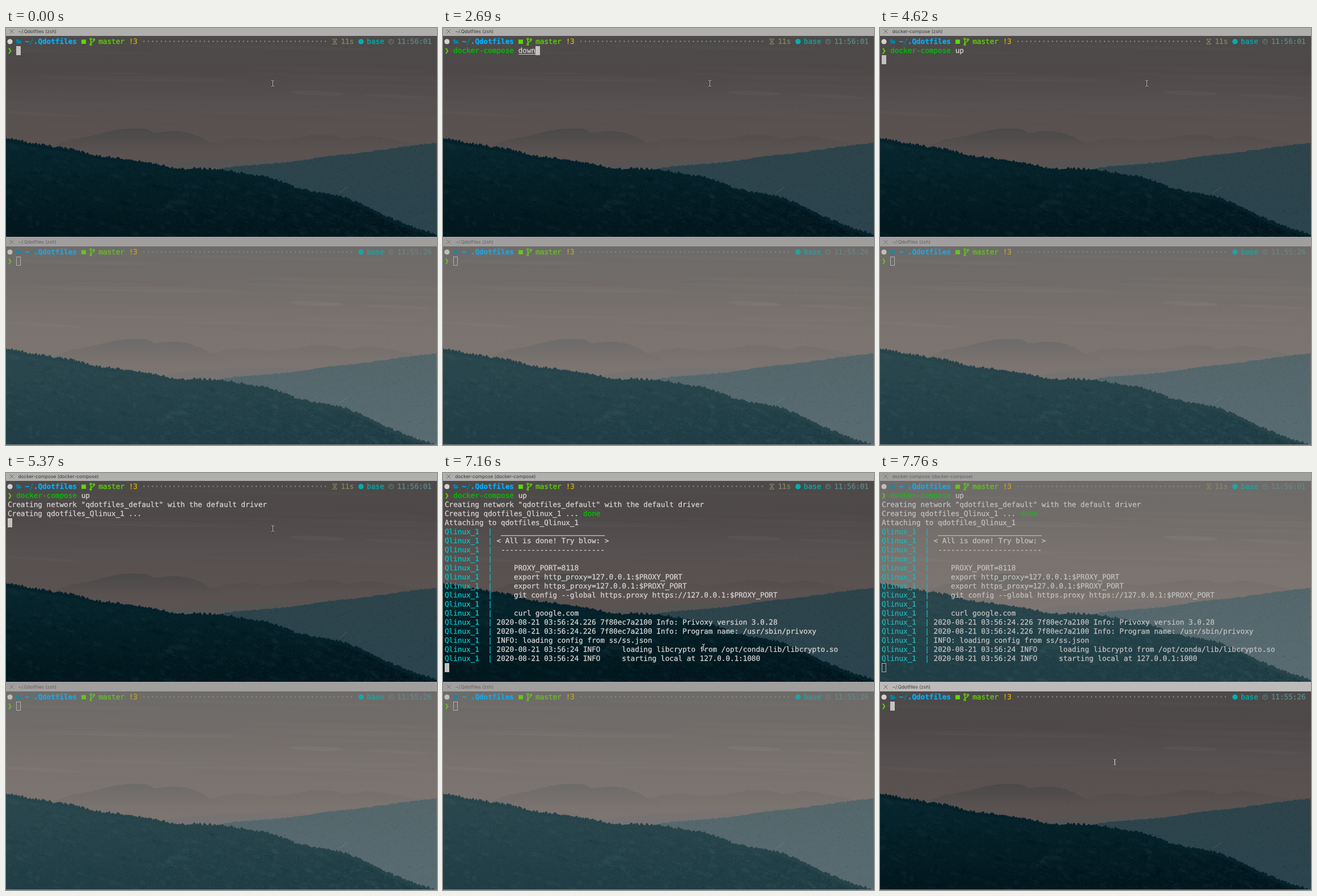
An HTML page with a canvas for the animation above (8000 ms loop, 760x737 px).

```html
<!DOCTYPE html>
<html lang="en">
<head>
<meta charset="utf-8">
<title>Terminal</title>
<style>
  html, body { margin: 0; width: 100%; height: 100%; overflow: hidden; background: #4e4a49; }
  canvas, svg { position: absolute; left: 0; top: 0; }
  text { white-space: pre; text-rendering: geometricPrecision; font-variant-ligatures: none; }
  .mono { font: 12.67px "DejaVu Sans Mono", "Liberation Mono", monospace; }
  .bar { font: 8.3px Inter, Roboto, sans-serif; }
  .dim { filter: contrast(.76); }
</style>
</head>
<body>
<canvas id="view" width="760" height="737"></canvas>
<svg id="ui" width="760" height="737" viewBox="0 0 760 737"></svg>
<script>
const LOOP = 8000, CELL = 7.63, ROW = 16, W = 760, PANE = 372;
const C = {
  text: '#d4d2d1', green: '#00c200', cyan: '#00c5c7', ghost: '#6e6b6a', cursor: '#c4c2c1',
  lime: '#5fd700', blue: '#00afff', deep: '#0087af', gold: '#d7af00', dots: '#918c89',
  olive: '#87875f', teal: '#00afaf', steel: '#5f8787'
};

// ---------- landscape ----------
const lit = {
  sky: ['#4c4a49', '#4e4948', '#565050', '#595250', '#5c5452'],
  far: ['#4b494a', '#595250'], mist: '#565453',
  right: ['#2e444b', '#2b444d'], front: ['#08272f', '#02181f'],
  tree: '#05212a', light: '#2c5258', dark: '#000f16', cloud: '#6a6665'
};
const grey = {
  sky: ['#6d6b69', '#706c69', '#78726e', '#7b7470', '#7d7672'],
  far: ['#6d6b6b', '#7a736f'], mist: '#767372',
  right: ['#55676b', '#586b71'], front: ['#2c484f', '#213e46'],
  tree: '#28444b', light: '#4f6f74', dark: '#12323b', cloud: '#8b8784'
};
const farRidge = [[88, 207], [115, 197], [150, 191], [185, 182], [215, 178], [246, 178], [262, 185],
  [300, 182], [325, 186], [345, 194], [364, 205], [387, 209]];
const lowRidge = [[355, 206], [387, 197], [420, 194], [460, 199], [505, 195], [540, 189], [570, 189],
  [602, 196], [640, 190], [685, 197], [735, 207]];
const rightRidge = [[355, 253], [400, 245], [500, 237], [560, 228], [640, 219], [700, 210], [760, 203]];
const frontRidge = [[0, 197], [45, 205], [120, 217], [160, 228], [230, 236], [270, 243], [300, 251],
  [340, 250], [380, 252], [420, 259], [460, 265], [490, 275], [520, 286], [600, 302], [640, 319],
  [680, 339], [720, 355], [760, 367]];

function random(seed) {
  return () => (seed = (seed * 16807) % 2147483647) / 2147483647;
}

function heightAt(ridge, x) {
  let i = 1;
  while (i < ridge.length - 1 && ridge[i][0] < x) i++;
  const [x0, y0] = ridge[i - 1], [x1, y1] = ridge[i];
  return y0 + (y1 - y0) * (x - x0) / (x1 - x0);
}

function scene(p) {
  const canvas = document.createElement('canvas');
  canvas.width = W;
  canvas.height = 370;
  const g = canvas.getContext('2d'), rnd = random(4711);

  const fade = (y0, y1, stops) => {
    const f = g.createLinearGradient(0, y0, 0, y1);
    stops.forEach((c, i) => f.addColorStop(i / (stops.length - 1), c));
    return f;
  };
  const blob = (x, y, rx, ry, color, alpha, tilt = 0) => {
    g.globalAlpha = alpha;
    g.fillStyle = color;
    g.beginPath();
    g.ellipse(x, y, rx, ry, tilt, 0, 7);
    g.fill();
    g.globalAlpha = 1;
  };
  const hill = (ridge, fill, rough, step) => {
    const [start] = ridge[0], [end] = ridge[ridge.length - 1];
    g.beginPath();
    g.moveTo(start, 370);
    for (let x = start; x <= end; x += step) g.lineTo(x, heightAt(ridge, x) - (rnd() - .4) * rough);
    g.lineTo(end, 370);
    g.fillStyle = fill;
    g.fill();
  };

  g.fillStyle = fade(14, 250, p.sky);
  g.fillRect(0, 0, W, 370);
  for (let i = 0; i < 26; i++)
    blob(rnd() * W, 30 + rnd() * 140, 70 + rnd() * 170, 1.5 + rnd() * 4, i % 2 ? p.cloud : p.sky[0], .07, .02);
  blob(548, 115, 48, 4, p.cloud, .22, .04);
  blob(690, 121, 60, 3, p.cloud, .14, .05);
  blob(60, 152, 75, 3, p.cloud, .14, .06);

  g.globalAlpha = .6;
  hill(lowRidge, fade(184, 215, p.far), 1.6, 3);
  g.globalAlpha = 1;
  hill(farRidge, fade(180, 218, p.far), 1.6, 3);
  g.fillStyle = fade(216, 250, [p.far[1], p.sky[4]]);
  g.fillRect(0, 216, W, 154);
  hill([[265, 246], [310, 236], [380, 231], [470, 228], [560, 232]], p.mist, 1, 4);

  hill(rightRidge, fade(205, 330, p.right), 2.4, 2);
  for (let i = 0; i < 3500; i++) {
    const x = 380 + rnd() * 380, y = heightAt(rightRidge, x) + rnd() * 150;
    g.globalAlpha = .12;
    g.fillStyle = i % 2 ? p.light : p.dark;
    g.fillRect(x, y, 2, 1);
  }
  g.globalAlpha = .6;
  g.strokeStyle = p.cloud;
  g.lineWidth = 1;
  g.beginPath();
  g.moveTo(588, 291);
  g.lineTo(602, 281);
  g.stroke();
  g.globalAlpha = 1;

  hill(frontRidge, fade(200, 350, p.front), 3, 2);
  g.fillStyle = p.tree;
  for (let x = 0; x < W; x += 2 + rnd() * 4) {
    const y = heightAt(frontRidge, x), h = 1 + rnd() * 4;
    g.beginPath();
    g.moveTo(x - 4, y + 4);
    g.lineTo(x - 2, y - h + 2);
    g.lineTo(x, y - h);
    g.lineTo(x + 2, y - h + 2);
    g.lineTo(x + 4, y + 4);
    g.fill();
  }
  const inside = draw => {
    const x = rnd() * W, top = heightAt(frontRidge, x) + 4;
    draw(x, top + rnd() * (372 - top));
  };
  for (let i = 0; i < 420; i++)
    inside((x, y) => blob(x, y + 3, 3 + rnd() * 8, 2 + rnd() * 3, i % 2 ? p.light : p.dark, .09, .3));
  for (let i = 0; i < 9000; i++)
    inside((x, y) => {
      g.globalAlpha = .08 + rnd() * .18;
      g.fillStyle = i % 5 < 2 ? p.light : p.dark;
      g.fillRect(x, y, 1 + rnd() * 2, 1);
    });
  g.globalAlpha = 1;
  return canvas;
}

// ---------- terminal ----------
const esc = s => s.replace(/&/g, '&amp;').replace(/</g, '&lt;');
const colX = c => 3 + c * CELL;
// The thin stroke gives the regular face a medium weight.
const write = (col, row, s, color = C.text, extra = '') =>
  `<text x="${colX(col)}" y="${28 + row * ROW}" fill="${color}" stroke="${color}" stroke-width=".3" ${extra}>${esc(s)}</text>`;

function caret(col, row, on) {
  const x = Math.round(colX(col)), y = 16 + row * ROW;
  return on
    ? `<rect x="${x}" y="${y}" width="8" height="16" fill="${C.cursor}"/>`
    : `<rect x="${x + .5}" y="${y + .5}" width="7" height="15" fill="none" stroke="${C.cursor}"/>`;
}

function header(clock, took) {
  const bold = 'font-weight="700"';
  const line = (d, color) => `<path d="${d}" fill="none" stroke="${color}" stroke-width="1.2"/>`;
  let out = `<circle cx="7" cy="24" r="4.6" fill="${C.text}"/>
    <path d="M18 20h3l1 1.5h4v1.5h-6l-2 4zM20.5 23.5h7l-1.5 4h-7.5z" fill="${C.deep}"/>
    <rect x="133" y="20.5" width="8" height="7.5" fill="${C.lime}"/>
    <g fill="none" stroke="${C.lime}" stroke-width="1.4"><circle cx="149.5" cy="19.5" r="1.5"/>
    <circle cx="149.5" cy="29" r="1.5"/><circle cx="155" cy="20.5" r="1.5"/>
    <path d="M149.5 21v6.5M155 22c0 3-5.5 2-5.5 5"/></g>
    <circle cx="626" cy="24" r="4.7" fill="${C.teal}"/>
    <circle cx="679" cy="24" r="4" fill="none" stroke="${C.steel}" stroke-width="1.2"/>`;
  out += line('M679 21.5v2.5h-2', C.steel);
  if (took) out += line('M575.5 19.5h8.5M575.5 28.5h8.5M577 20c0 3 5.5 5 5.5 8M582.5 20c0 3-5.5 5-5.5 8', C.olive)
    + write(77, 0, took, C.olive);
  out += write(4, 0, '~', C.blue, bold) + write(5, 0, '/', C.deep) + write(6, 0, '.Qdotfiles', C.blue, bold);
  out += write(21, 0, 'master', C.lime) + write(28, 0, '!3', C.gold);
  out += write(31, 0, '·'.repeat(took ? 43 : 49), C.dots);
  return out + write(83, 0, 'base', C.teal) + write(90, 0, clock, C.steel)
    + write(0, 1, '❯', C.lime, bold);
}

const log = [
  ' ' + '_'.repeat(24), '< All is done! Try blow: >', ' ' + '-'.repeat(24), '',
  '    PROXY_PORT=8118',
  '    export http_proxy=127.0.0.1:$PROXY_PORT',
  '    export https_proxy=127.0.0.1:$PROXY_PORT',
  '    git config --global https.proxy https://127.0.0.1:$PROXY_PORT',
  '', '    curl google.com',
  '2020-08-21 03:56:24.226 7f80ec7a2100 Info: Privoxy version 3.0.28',
  '2020-08-21 03:56:24.226 7f80ec7a2100 Info: Program name: /usr/sbin/privoxy',
  'INFO: loading config from ss/ss.json',
  '2020-08-21 03:56:24 INFO     loading libcrypto from /opt/conda/lib/libcrypto.so',
  '2020-08-21 03:56:24 INFO     starting local at 127.0.0.1:1080'
];

function output(count) {
  let out = '';
  if (count > 0) out += write(0, 2, 'Creating network "qdotfiles_default" with the default driver');
  if (count > 1) out += write(0, 3, 'Creating qdotfiles_Qlinux_1 ...');
  if (count > 2) {
    out += write(32, 3, 'done', C.green) + write(0, 4, 'Attaching to qdotfiles_Qlinux_1');
    log.forEach((s, i) => out += write(0, 5 + i, 'Qlinux_1  |', C.cyan) + write(12, 5 + i, s));
  }
  return out;
}

function command({ cmd, arg, ghost }) {
  const end = 2 + cmd.length + arg.length, word = arg.trim();
  let out = write(2, 1, cmd, C.green) + write(2 + cmd.length, 1, arg) + write(end, 1, ghost, C.ghost);
  if (word && 'down'.startsWith(word))
    out += `<rect x="133" y="46" width="${word.length * CELL}" height="1" fill="${C.text}"/>`;
  return out;
}

function bar(y, title, on, shade) {
  const ink = on ? '#3c3b3b' : '#626060';
  return `<rect y="${y - 1}" width="760" height="17" fill="${on ? shade : '#a19f9e'}"/>
    <path d="M6.5 ${y + 4.5}l7 7m0-7l-7 7" stroke="${on ? '#6b6a6a' : '#757373'}"/>
    <text class="bar" x="21.5" y="${y + 11.2}" fill="${ink}">${title}</text>`;
}

function beam([x, y]) {
  const d = `M${x - 2.5} ${y - 5.5}q2.5 0 2.5 2v7q0 2-2.5 2M${x + 2.5} ${y - 5.5}q-2.5 0-2.5 2v7q0 2 2.5 2`;
  return `<g fill="none"><path d="${d}" stroke="#222" stroke-width="2.2"/>
    <path d="${d}" stroke="#d4d2d1" stroke-width="1"/></g>`;
}

// ---------- timeline: each step changes only what it names ----------
const DC = 'docker-compose', HOME = '~/.Qdotfiles (zsh)';
const steps = [
  [0, { cmd: '', arg: '', ghost: '', lines: -1, title: HOME, mouse: [470.5, 98], focus: 0 }],
  [890, { cmd: 'd', ghost: 'ocker-compose down' }],
  [2690, { cmd: DC, arg: ' down', ghost: '' }],
  [2980, { arg: ' do' }],
  [3130, { ghost: 'wn' }],
  [3280, { arg: ' d', ghost: 'own' }],
  [3430, { arg: ' ', ghost: 'down' }],
  [4030, { arg: ' up', ghost: ' -d' }],
  [4620, { ghost: '', lines: 0, title: DC + ' (zsh)' }],
  [5220, { lines: 1 }],
  [5370, { lines: 2, title: `${DC} (${DC})` }],
  [6260, { lines: 18 }],
  [7160, { mouse: [459.5, 308] }],
  [7310, { mouse: [459.5, 337] }],
  [7460, { mouse: [421, 478] }],
  [7610, { mouse: [415, 511] }],
  [7760, { mouse: [414, 511], focus: 1 }]
];
const states = [];
for (const [at, change] of steps) states.push({ ...states[states.length - 1], ...change, at });

const view = document.getElementById('view').getContext('2d');
const ui = document.getElementById('ui');
const scenes = { lit: scene(lit), grey: scene(grey) };

function paint(s) {
  const top = s.focus === 0;
  view.drawImage(top ? scenes.lit : scenes.grey, 0, 0);
  view.drawImage(top ? scenes.grey : scenes.lit, 0, PANE);
  const spot = s.lines < 0 ? [2 + s.cmd.length + s.arg.length, 1] : [0, 2 + s.lines];
  ui.innerHTML =
    `<g class="mono${top ? '' : ' dim'}">${header('11:56:01', '11s')}${command(s)}${output(s.lines)}${caret(...spot, top)}</g>
     <g class="mono${top ? ' dim' : ''}" transform="translate(0 ${PANE})">${header('11:55:26')}${caret(2, 1, !top)}</g>`
    + bar(-2, s.title, top, '#b1afae') + bar(370, HOME, !top, '#bcbbba')
    + '<rect y="736" width="760" height="1" fill="#858585"/>' + beam(s.mouse);
}

let shown = -1;
function tick(now) {
  const t = now % LOOP;
  let i = states.length - 1;
  while (states[i].at > t) i--;
  if (i !== shown) paint(states[shown = i]);
  requestAnimationFrame(tick);
}
tick(performance.now());
</script>
</body>
</html>
```
